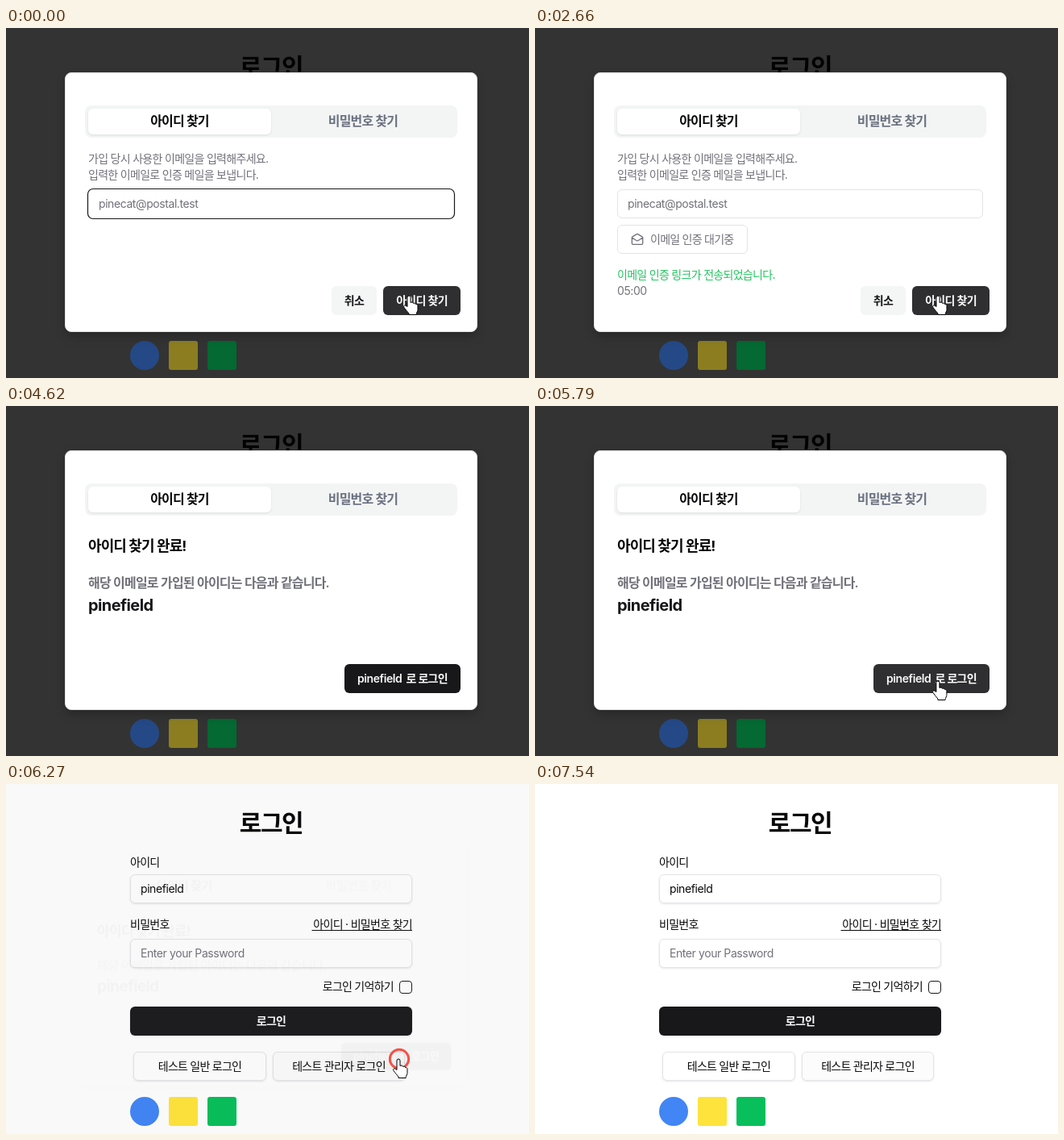
An HTML page for the animation above (7800 ms loop, 649 px wide and 434 px high).

```html
<!DOCTYPE html>
<html lang="ko">
<head>
<meta charset="utf-8">
<style>
  html, body { margin: 0; width: 100%; height: 100%; overflow: hidden; background: #fff; }
  svg { display: block; width: 649px; height: 434px; font-family: Inter, 'Noto Sans CJK KR', 'Noto Sans CJK', sans-serif; }
  text { white-space: pre; letter-spacing: -.03em; }
  .ko { letter-spacing: -.05em; }
  .sh { filter: drop-shadow(0 1px 1px #00000018); }
  .panel { filter: drop-shadow(0 6px 6px #0003); }
</style>
</head>
<body>
<svg id="stage" viewBox="0 0 649 434"></svg>
<script>
const LOOP = 7800, INK = '#09090b', DARK = '#18181b', HOVER = '#2f2f31', GRAY = '#71717a', LINE = '#e4e4e7';
const USER = 'pinefield', MAIL = 'pinecat@postal.test';

// y is the middle of the line
function text(x, y, s, { size = 14, weight = 400, fill = INK, anchor = 'start', extra = '' } = {}) {
  const ko = /[가-힣]/.test(s) ? 'class="ko"' : '';
  return `<text ${ko} x="${x}" y="${y + size * .36}" font-size="${size}" font-weight="${weight}" fill="${fill}" text-anchor="${anchor}" ${extra}>${s}</text>`;
}
const rect = (x, y, w, h, fill, rx = 6, extra = '') =>
  `<rect x="${x}" y="${y}" width="${w}" height="${h}" rx="${rx}" fill="${fill}" ${extra}/>`;
const outline = (x, y, w, h, extra = '', fill = '#fff', color = LINE) =>
  rect(x + .5, y + .5, w - 1, h - 1, fill, 5.5, `stroke="${color}" ${extra}`);
const mid = { anchor: 'middle' }, medium = { weight: 500 };
const white = { weight: 600, fill: '#fafafa' };

const page = `
  ${text(329, 48, '로그인', { ...mid, size: 30, weight: 700 })}
  ${text(154, 97, '아이디', medium)}
  ${outline(154, 112, 350, 36, 'class="sh"')}
  ${text(167, 130, USER)}
  ${text(154, 174, '비밀번호', medium)}
  ${text(504, 174, '아이디 · 비밀번호 찾기', { anchor: 'end' })}
  <path d="M379.500 181.500H504" stroke="${INK}"/>
  ${outline(154, 192, 350, 36, 'class="sh"')}
  ${text(167, 210, 'Enter your Password', { fill: GRAY })}
  ${text(481, 251, '로그인 기억하기', { ...medium, anchor: 'end' })}
  ${rect(488.5, 244.5, 15, 15, '#fff', 3.5, `stroke="${DARK}"`)}
  ${rect(154, 276, 350, 36, DARK, 6, 'id="login" class="sh"')}
  ${text(329, 294, '로그인', { ...white, ...mid })}
  ${outline(158, 332, 165, 36, 'class="sh"')}
  ${text(240.5, 350, '테스트 일반 로그인', { ...mid, ...medium })}
  ${outline(331, 332, 164, 36, 'id="admin" class="sh"', '#fcfcfc')}
  ${text(413, 350, '테스트 관리자 로그인', { ...mid, ...medium })}`;

const icons = `
  <circle cx="172" cy="406" r="18" fill="#4285f4"/>
  ${rect(202, 388, 36, 36, '#fee33c', 3)}
  ${rect(250, 388, 36, 36, '#08bf5b', 3)}`;

const form = `
  ${text(102, 162, '가입 당시 사용한 이메일을 입력해주세요.', { fill: GRAY })}
  ${text(102, 182, '입력한 이메일로 인증 메일을 보냅니다.', { fill: GRAY })}
  ${outline(102, 200, 454, 36)}
  <g id="focus">${rect(101.5, 199.5, 455, 37, '#fff', 6.5, `stroke="${DARK}" stroke-width="1.2"`)}</g>
  ${text(115, 218, MAIL, { fill: GRAY })}
  <g id="sending">
    ${outline(102, 244, 149, 36)}
    <path id="spin" d="M133 262a6 6 0 1 1-4.150-5.710" fill="none" stroke="${GRAY}" stroke-width="1.4" stroke-linecap="round"/>
    ${text(143, 262, '이메일 전송 중...', { ...medium, fill: GRAY })}
  </g>
  <g id="waiting">
    ${outline(102, 244, 162, 36)}
    <path d="M133.700 260v7a1.300 1.300 0 0 1-1.300 1.300H121.600a1.300 1.300 0 0 1-1.300-1.300V260q0-.8.600-1.100L126.300 255.600q.7-.4 1.400 0L133.100 258.900q.6.300.6 1.100l-6 3.700q-.7.400-1.400 0l-6-3.700"
      fill="none" stroke="${GRAY}" stroke-width="1.3" stroke-linejoin="round"/>
    ${text(143, 262, '이메일 인증 대기중', { ...medium, fill: GRAY })}
    ${text(102, 306, '이메일 인증 링크가 전송되었습니다.', { fill: '#22c55e' })}
    ${text(102, 326, '05:00', { fill: GRAY, extra: 'id="timer"' })}
  </g>
  ${rect(404, 320, 56, 36, '#f4f5f5')}
  ${text(432, 338, '취소', { ...mid, weight: 600, fill: DARK })}`;

const found = `
  ${text(102, 174, '아이디 찾기 완료!', { size: 18, weight: 700 })}
  ${text(102, 219, '해당 이메일로 가입된 아이디는 다음과 같습니다.', { size: 16, weight: 600, fill: GRAY })}
  ${text(102, 246.5, USER, { size: 20, weight: 700, fill: DARK })}`;

const dialog = `
  ${rect(73.5, 55.5, 511, 321, '#fff', 7.5, `stroke="${LINE}" class="panel"`)}
  ${rect(98, 96, 462, 40, '#f3f5f5', 8)}
  ${rect(102, 100, 227, 32, '#fff', 6, 'class="sh"')}
  ${text(215.5, 115, '아이디 찾기', { ...mid, size: 16, weight: 700 })}
  ${text(443, 115, '비밀번호 찾기', { ...mid, size: 16, weight: 700, fill: '#6b7280' })}
  <g id="form">${form}</g>
  <g id="found">${found}</g>
  ${rect(468, 320, 96, 36, DARK, 6, 'id="go"')}
  <g id="find">${text(516, 338, '아이디 찾기', { ...white, ...mid })}</g>
  <g id="enter">${text(548, 338, '로 로그인', { ...white, anchor: 'end' })}</g>
  <g id="name">${text(436, 338, USER, white)}</g>`;

document.getElementById('stage').innerHTML = `
  ${rect(0, 0, 649, 434, '#fff', 0)}
  ${page}
  <rect id="shade" width="649" height="434"/>
  <g id="icons">${icons}</g>
  <g id="dialog">${dialog}</g>
  <circle id="ring" fill="none" stroke="#f44336" stroke-width="3"/>
  <g id="cursor" fill="#fff" stroke="#000" stroke-linejoin="round">
    <path id="hand" transform="translate(-1 .5)" d="M-2 13V1.500a2 2 0 0 1 4 0V8c1.300-1 3.300-.5 3.700 1 1.300-.7 2.800 0 3.100 1.200 1.300-.4 2.200.5 2.200 1.800v5c0 2-1.500 3-1.800 5v1H0v-1.500C-2 19-4 17-6 14c-1.200-2 .8-3.500 2.500-2z"/>
    <path id="arrow" d="M.5.5v16l3.700-3.500 2.500 5.700 2.300-1-2.500-5.500h5z"/>
  </g>`;

const el = Object.fromEntries([...document.querySelectorAll('[id]')].map(e => [e.id, e]));
const set = (id, attrs) => { for (const k in attrs) el[id].setAttribute(k, attrs[k]); };
const fade = (id, v) => set(id, { opacity: +v });
const span = (t, from, ms) => Math.min(1, Math.max(0, (t - from) / ms));
const easeOut = x => 1 - (1 - x) ** 2.5;

// time, x, y of the pointer tip
const path = [
  [0, 501, 332], [4320, 501, 332], [5250, 631, 352], [5550, 540, 349], [5790, 501, 341], [5950, 488, 341],
  [6880, 488, 341], [7060, 490, 357], [7250, 497, 292], [7400, 514, 140], [7540, 532, -26], [LOOP, 532, -26]
];
function pointer(t) {
  const i = path.findIndex(p => p[0] > t);
  const [a, b] = [path[i - 1], path[i]];
  const k = (t - a[0]) / (b[0] - a[0]);
  return [a[1] + (b[1] - a[1]) * k, a[2] + (b[2] - a[2]) * k];
}

function draw(t) {
  const done = t >= 4320, named = t >= 4350;
  const close = easeOut(span(t, 6120, 200)), open = t < 6120;
  const [x, y] = pointer(t);
  const shown = !done || (t >= 5250 && t < 7540);
  const over = (l, top, r, b) => shown && x >= l && x <= r && y >= top && y <= b;

  const left = named ? 420 : done ? 480 : 468;
  const onGo = open && over(left, 320, 564, 356);
  const onLogin = !open && over(154, 276, 504, 312);
  const onAdmin = !open && over(331, 332, 495, 368);

  fade('form', !done);
  fade('focus', t < 550);
  fade('sending', t < 2130 ? span(t, 560, 200) : 0);
  set('spin', { transform: `rotate(${(t - 440) * .36} 127 262)` });
  fade('waiting', t < 2130 ? 0 : .06 + .94 * span(t, 2130, 500));
  el.timer.textContent = t < 3660 ? '05:00' : '04:59';

  const slide = easeOut(span(t, 4320, 300));
  fade('found', done ? Math.max(.02, slide) : 0);
  set('found', { transform: `translate(${50 * (1 - slide)} 0)` });

  set('go', { x: left, width: 564 - left, fill: onGo ? HOVER : DARK });
  fade('find', !done);
  fade('enter', done);
  fade('name', named);
  set('login', { fill: onLogin ? HOVER : DARK });
  set('admin', { fill: onAdmin && close === 1 ? '#f5f5f6' : '#fcfcfc' });

  fade('dialog', 1 - close);
  set('dialog', { transform: `translate(329 ${216 + 6 * close}) scale(${1 - .05 * close}) translate(-329 -216)` });
  fade('shade', .8 * (1 - close));
  el.icons.style.filter = `brightness(${.55 + .45 * close})`;

  const second = t > 6000, age = t - (second ? 6055 : 550);
  set('ring', { cx: second ? 488 : 501, cy: second ? 341 : 332, r: Math.max(0, age * .054) });
  fade('ring', age > 0 && age < 780 ? 1 - (age / 780) ** 2 : 0);

  const hand = onGo || onLogin || onAdmin;
  fade('cursor', shown);
  set('cursor', { transform: `translate(${x} ${y})` });
  fade('hand', hand);
  fade('arrow', !hand);
}

const start = performance.now();
(function tick() {
  draw((performance.now() - start) % LOOP);
  requestAnimationFrame(tick);
})();
</script>
</body>
</html>
```
